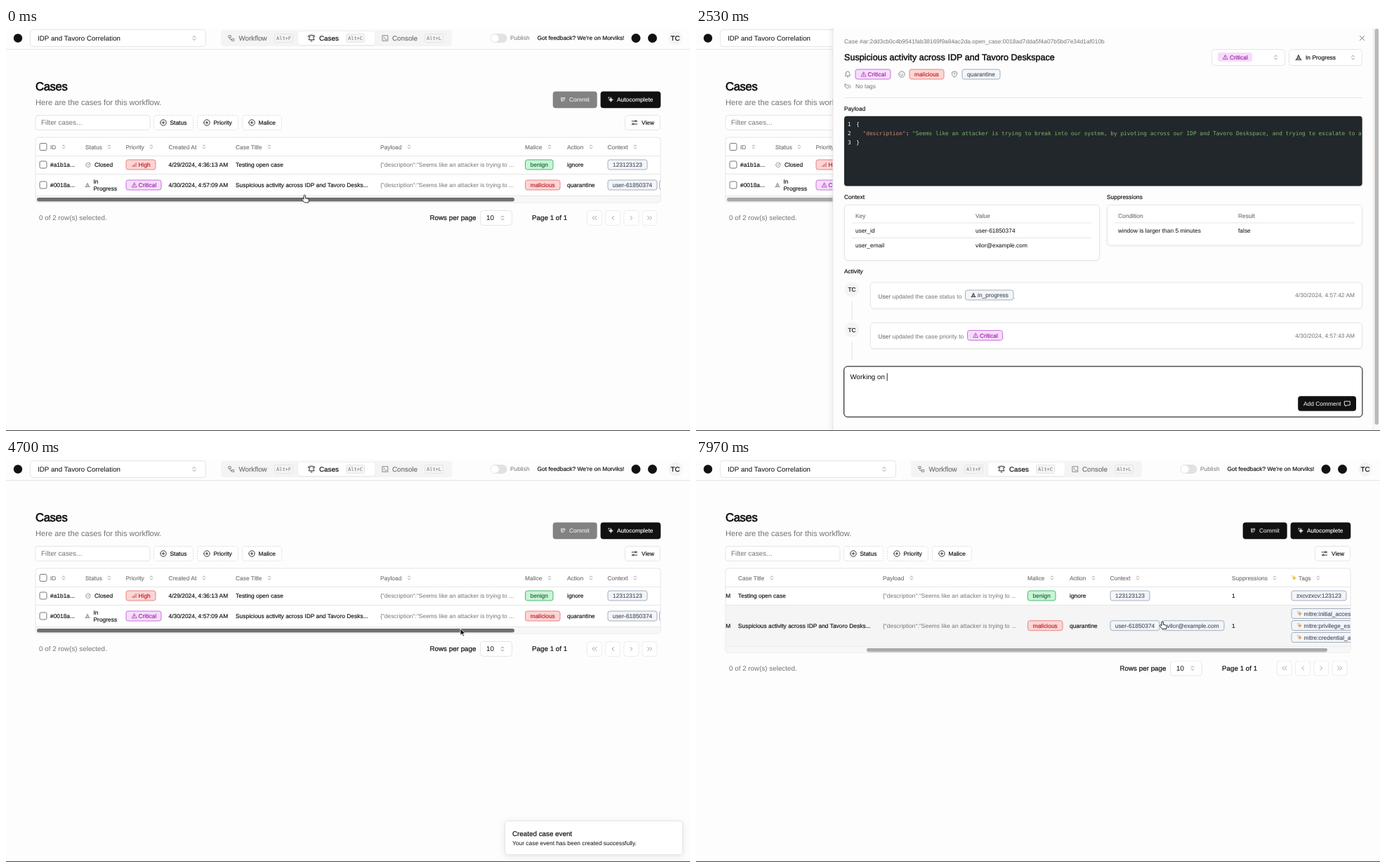
These frames come from a looping animation (974x575 px, 8000 ms). An HTML page:

```html
<!DOCTYPE html>
<html lang="en">
<head>
<meta charset="utf-8">
<title>Cases</title>
<style>
html, body { margin: 0; width: 100%; height: 100%; overflow: hidden; background: #fdfdfd; }
svg { display: block; width: 100vw; height: 100vh; }
text { font: 8.35px "Liberation Sans", Arial, sans-serif; letter-spacing: .004em; fill: currentColor; color: #0a0a0a; white-space: pre; text-rendering: geometricPrecision; }
.l { font-size: 9.74px; }
.xl { font-size: 11.13px; letter-spacing: 0; }
.t { font-size: 12.52px; }
.h { font-size: 16.7px; letter-spacing: -.36px; }
.m { font-family: "DejaVu Sans Mono", monospace; font-size: 7.82px; letter-spacing: 0; }
.k { font-family: "DejaVu Sans Mono", monospace; font-size: 7px; letter-spacing: 0; }
.b { stroke: currentColor; stroke-width: .018em; }
.b.t, .b.h { stroke-width: .035em; }
.g { color: #737373; }
.w { color: #fff; }
.mid { text-anchor: middle; }
.end { text-anchor: end; }
.it { font-style: italic; }
.icon { stroke-width: 2; stroke-linecap: round; stroke-linejoin: round; }
.soft { filter: drop-shadow(0 1px 1px #0000000d); }
.lift { filter: drop-shadow(0 2px 4px #0000001a); }
#spin { transform-origin: 861px 102px; animation: spin 1s linear infinite; }
@keyframes spin { to { transform: rotate(360deg); } }
</style>
</head>
<body>
<svg id="stage" viewBox="0 0 974 575"></svg>
<script>
const LINE = '#e5e5e5', GRAY = '#737373', INK = '#111', MIST = '#f4f4f5';
const ring = 'M2 12a10 10 0 1 0 20 0a10 10 0 1 0-20 0';
const bell = 'M6 8a6 6 0 0 1 12 0c0 7 3 9 3 9H3s3-2 3-9M10 21h4';
const paths = {
  sort: 'm7 15 5 5 5-5M7 9l5-5 5 5',
  plus: ring + 'M8 12h8M12 8v8',
  check: ring + 'm7-1 3 4 7-9',
  cone: 'M2 20h20M5 20 12 3l7 17M9 11h6M7 16h10',
  alert: 'M12 3 2 21h20zM12 9v5M12 17.5v.5',
  bars: 'M4 20v-2M9 20v-6M14 20V10M20 20V4',
  flow: 'M3 3h7v7H3zM14 14h7v7h-7zM7 10v5q0 2 2 2h5',
  bell,
  alarm: bell + 'M2 8q0-4 3-6M22 8q0-4-3-6',
  console: 'M3 3h18v18H3zM7 8l3 3-3 3M12 16h5',
  sliders: 'M3 7h11M19 7h2M16 4.5a2.5 2.5 0 1 0 .1 0M3 17h2M10 17h11M7.5 14.5a2.5 2.5 0 1 0 .1 0',
  smile: ring + 'M8 14q4 4 8 0M9 9v.1M15 9v.1',
  shield: 'M20 13c0 5-4 7-8 9-4-2-8-4-8-9V5l8-3 8 3zM9.5 9a2.5 2.5 0 1 1 2.5 3.5M12 17v.1',
  tags: 'M2 5v6l8 8 6-6-8-8zM15 5l6.5 6.5q1 1.5 0 3L18 18M6 9v.1',
  close: 'M4 4l16 16M20 4 4 20',
  message: 'M3 4h18v13H11l-5 4v-4H3z',
  spark: 'M13 5l2 6 6 2-6 2-2 6-2-6-6-2 6-2zM5 3v4M3 5h4',
  spinner: 'M21 12a9 9 0 1 1-6-8.5',
  commit: 'M4 4h6v6H4zM15 4h5v5h-5zM4 15h6M7 10v11M10 18h5q3 0 3-4V9',
  first: 'm11 18-6-6 6-6M19 18l-6-6 6-6',
  prev: 'm15 18-6-6 6-6',
  next: 'm9 18 6-6-6-6',
  last: 'm5 18 6-6-6-6M13 18l6-6-6-6'
};

const text = (x, y, s, cls = '') => `<text x="${x}" y="${y}" class="${cls}">${s}</text>`;
const rect = (x, y, w, h, r, fill, stroke = 'none', more = '') =>
  `<rect x="${x}" y="${y}" width="${w}" height="${h}" rx="${r}" fill="${fill}" stroke="${stroke}" ${more}/>`;
const icon = (name, cx, cy, size = 9, color = INK) =>
  `<path class="icon" d="${paths[name]}" stroke="${color}" fill="${name === 'spark' ? color : 'none'}" ` +
  `transform="translate(${cx - size / 2} ${cy - size / 2}) scale(${size / 24})"/>`;
const dot = (cx, cy, r, fill) => `<circle cx="${cx}" cy="${cy}" r="${r}" fill="${fill}"/>`;
const hline = (x1, x2, y) => `<path d="M${x1} ${y}H${x2}" stroke="${LINE}"/>`;
const box = (x, y, w, h, more = '') => rect(x, y, w, h, 4, '#fff', LINE, more);
const group = (id, body) => `<g id="${id}">${body}</g>`;

// fill, border, text
const tones = {
  red: ['#fcd5d5', '#e88585', '#b91c1c'],
  green: ['#c9f4d6', '#4bb873', '#166534'],
  pink: ['#f6dcfc', '#c873d8', '#96209f'],
  slate: ['#f3f5f8', '#a3aebd', '#4b5563']
};
const badge = (x, cy, w, label, tone, sign, signColor) => {
  const [fill, border, color] = tones[tone];
  const y = cy + 3;
  const body = sign
    ? icon(sign, x + 11.5, cy, 8, signColor || color) + text(x + 17.5, y, label, 'b')
    : text(x + w / 2, y, label, 'b mid');
  return rect(x, cy - 7, w, 14, 3, fill, border) + `<g class="tone-${tone}">${body}</g>`;
};
const critical = (x, cy) => badge(x, cy, 50, 'Critical', 'pink', 'alert');

const keyTab = (x, s) => rect(x, 8.5, 26, 12, 2, MIST, LINE) + text(x + 13, 17, s, 'k g mid');
const dashed = (x, w, s) => rect(x + .5, 124.5, w, 21, 4, '#fff', '#dcdcdc', 'stroke-dasharray="2 1.5"') +
  icon('plus', x + 14, 135, 10) + text(x + 23.5, 138, s, 'b');
const heading = (x, s, sortX) => text(x, 172.5, s, 'g b') + icon('sort', sortX, 169.5, 8, GRAY);
const checkbox = cy => rect(48, cy - 5, 10, 10, 2, '#fff', '#777');
const pageButton = (x, name) => rect(x, 260.5, 21, 21, 4, '#fff', '#ececec') + icon(name, x + 10.5, 271, 10, '#8a8a8a');

const topBar = hline(0, 974, 30.5) + dot(17, 14.5, 6.2, INK) +
  box(34.5, 2.5, 250, 24) + text(45, 18, 'IDP and Tavoro Correlation', 'l') + icon('sort', 268, 14.5, 9, GRAY) +
  rect(306, 3, 329, 23, 4, MIST) + rect(416, 5, 109, 19, 3, '#fff', 'none', 'class="soft"') +
  icon('flow', 321, 14.5, 10, GRAY) + text(331.5, 18, 'Workflow', 'l g b') + keyTab(382.5, 'Alt+F') +
  icon('alarm', 435, 14.5, 11) + text(446, 18, 'Cases', 'l b') + keyTab(484.5, 'Alt+C') +
  icon('console', 540, 14.5, 10, GRAY) + text(550, 18, 'Console', 'l g b') + keyTab(596.5, 'Alt+L') +
  rect(689.5, 8, 24, 13, 6.5, '#e2e2e2') + dot(696, 14.5, 5.6, '#fff') + text(718, 17.2, 'Publish', 'g') +
  text(756.5, 17.3, "Got feedback? We're on Morviks!", 'b') +
  dot(897, 14.5, 6.5, INK) + dot(920.5, 14.5, 6.5, INK) + dot(953, 14.5, 10, MIST) + text(953, 18, 'TC', 'l b mid');

const toolbar = text(42, 88.5, 'Cases', 'h b') + text(42, 110, 'Here are the cases for this workflow.', 'xl g') +
  group('commit', rect(778.7, 90.5, 63, 23.7, 4, INK)) + icon('commit', 793, 102, 8, '#fff') + text(802, 105, 'Commit', 'w') +
  group('auto', rect(846.6, 90.5, 85.7, 23.7, 4, 'inherit')) +
  group('sparkle', icon('spark', 861, 102, 9, '#fff')) +
  group('loading', group('spin', icon('spinner', 861, 102, 9, '#fff'))) + text(870, 105, 'Autocomplete', 'w b') +
  box(42, 124.5, 163, 21) + text(50, 138.3, 'Filter cases...', 'l g') +
  dashed(210, 56, 'Status') + dashed(272, 58, 'Priority') + dashed(336, 56, 'Malice') +
  box(881.5, 124.5, 50, 21) + icon('sliders', 895, 135, 10) + text(905, 138, 'View', 'b');

const payload = '{"description":"Seems like an attacker is trying to ...';
const tableCells = checkbox(169.5) + [
  [63, 'ID', 82], [113, 'Status', 147], [170.5, 'Priority', 207], [231.5, 'Created At', 282],
  [327, 'Case Title', 375], [533, 'Payload', 574], [739, 'Malice', 774], [799, 'Action', 833],
  [856.5, 'Context', 896], [1030, 'Suppressions', 1091], [1125, 'Tags', 1153]
].map(h => heading(...h)).join('') + icon('spark', 1118.5, 169.5, 8, '#e3b93c') +
  checkbox(195) + text(63, 198, '#a1b1a...', 'b') + icon('check', 117, 195.3, 8, GRAY) + text(126, 198, 'Closed', 'b') +
  badge(171, 195, 42, 'High', 'red', 'bars') + text(231.5, 198, '4/29/2024, 4:36:13 AM', 'b') +
  text(327, 198, 'Testing open case', 'b') + text(533, 198, payload, 'g') + badge(739.5, 195, 39.5, 'benign', 'green') +
  text(799, 198, 'ignore', 'b') + badge(857, 195, 56, '123123123', 'slate') + text(1030, 198, '1', 'b') +
  badge(1115, 195, 78, 'zxcvzxcv:123123', 'slate') +
  group('row2', checkbox(224) + text(63, 227, '#0018a...', 'b') + icon('cone', 116, 224, 8, GRAY) +
    text(124.5, 221.5, 'In', 'b') + text(124.5, 231.7, 'Progress', 'b') + critical(171, 224) +
    text(231.5, 227, '4/30/2024, 4:57:09 AM', 'b') +
    text(327, 227, 'Suspicious activity across IDP and Tavoro Desks...', 'b') + text(533, 227, payload, 'g') +
    badge(739.5, 224, 49.5, 'malicious', 'red') + text(799, 227, 'quarantine', 'b') +
    badge(857, 224, 70, 'user-61850374', 'slate') + badge(930.5, 224, 88.5, 'vilor@example.com', 'slate') +
    text(1030, 227, '1', 'b') + group('noTags', text(1115, 227, 'No tags', 'g'))) +
  group('newTags', ['initial_access', 'privilege_escalation', 'credential_access']
    .map((s, i) => badge(1115, 220.5 + 17 * i, 125, 'mitre:' + s, 'slate', 'spark', '#e39a3c')).join(''));

const table = rect(42, 156, 890, 93, 4, '#fff', LINE, 'id="card"') +
  `<g clip-path="url(#tableClip)">` + group('rowHover', rect(42, 209, 890, 30.5, 0, '#f5f5f5', 'none', 'id="rowFill"')) +
  hline(42, 932, 182.5) + hline(42, 932, 208.5) + group('cols', tableCells) + '</g>' +
  group('below', rect(42.5, 240, 889, 8.6, 3, '#f7f7f7') + hline(42, 932, 239.5) +
    group('thumbMove', group('thumbTone', rect(44, 242, 680, 5.4, 2.7, 'inherit', 'none', 'id="thumb"'))) +
    text(47, 274.3, '0 of 2 row(s) selected.', 'l g') + text(603.5, 274.3, 'Rows per page', 'l b') +
    box(675.5, 260.5, 45, 21) + text(684, 274.3, '10', 'l') + icon('sort', 707, 271, 9, GRAY) +
    text(749, 274.3, 'Page 1 of 1', 'l b') +
    ['first', 'prev', 'next', 'last'].map((s, i) => pageButton(827.5 + 26.2 * i, s)).join(''));

const choice = x => box(x, 30.5, 104, 23) + icon('sort', x + 91, 42, 9, GRAY);
const card = (x, y, w, h) => rect(x, y, w, h, 5, '#fff', LINE, 'class="soft"');
const activity = (y, h, message, date, extra) =>
  `<path d="M222 ${y + 27}v${h - 10}" stroke="${LINE}"/>` + dot(222, y + 10, 10.5, MIST) +
  text(222, y + 13.2, 'TC', 'b mid') + card(248.5, y, 700, h) +
  text(259.5, y + (h > 50 ? 18 : 22.5), `<tspan class="b">User</tspan> ${message}`, 'g') +
  text(938, y + (h > 50 ? 18 : 21), `4/30/2024, ${date} AM`, 'g end') + extra;

const typed = 'Working on it!';
const content = text(211, 22.3, 'Case #ar:2dd3cb0c4b9541fab38169f9a84ac2da.open_case:0018ad7dda5f4a07b5bd7e34d1af010b', 'g') +
  icon('close', 948.5, 14.5, 9, '#444') +
  text(211, 46, 'Suspicious activity across IDP and Tavoro Deskspace', 't b') +
  choice(734.5) + rect(743, 35, 49, 13, 3, tones.pink[0]) + icon('alert', 753.5, 41.5, 8, tones.pink[2]) +
  '<g class="tone-pink">' + text(760, 44.5, 'Critical', 'b') + '</g>' +
  choice(844.5) + icon('cone', 858, 42, 10) + text(868, 45, 'In Progress', 'b') +
  icon('bell', 216, 66, 10, GRAY) + critical(227, 66) + icon('smile', 293, 66, 10, GRAY) +
  badge(304, 66, 49, 'malicious', 'red') + icon('shield', 368, 66, 10, GRAY) + badge(379, 66, 54, 'quarantine', 'slate') +
  icon('tags', 216, 83.5, 10, GRAY) + text(227, 86.3, 'No tags', 'g') + hline(211, 949, 99.5) +
  text(211, 118, 'Payload', 'b') + rect(211, 125.7, 737.7, 99.8, 4, '#21272b') +
  '<g clip-path="url(#codeClip)">' + [1, 2, 3].map(i => text(216, 126.8 + 13 * i, i, 'm w')).join('') +
  text(228.3, 139.8, '{', 'm w') + text(228.3, 165.8, '}', 'm w') +
  text(237.5, 152.8, '<tspan fill="#ce8a70">"description"</tspan>: <tspan fill="#7fb36c">"Seems like an attacker is trying to break into our system, by pivoting across our IDP and Tavoro Deskspace, and trying to escalate to a</tspan>', 'm w') + '</g>' +
  text(211, 244, 'Context', 'b') + card(211.5, 252.5, 363, 79) +
  text(227, 271.3, 'Key', 'g b') + text(398, 271.3, 'Value', 'g b') + hline(222, 563, 278) +
  text(227, 291.5, 'user_id') + text(398, 291.5, 'user-61850374') + hline(222, 563, 299.5) +
  text(227, 313, 'user_email') + text(398, 313, 'vilor@example.com') +
  text(585, 244, 'Suppressions', 'b') + card(585.5, 252.5, 363, 57.5) +
  group('ruleHover', rect(596, 278, 342, 21.5, 0, '#f5f5f5')) +
  text(601, 271.3, 'Condition', 'g b') + text(772, 271.3, 'Result', 'g b') + hline(596, 938, 278) +
  text(601, 291.5, 'window is larger than 5 minutes') + text(772, 291.5, 'false') +
  text(211, 350.3, 'Activity', 'b') +
  activity(363, 37, 'updated the case status to', '4:57:42',
    badge(383.5, 381, 68.5, 'in_progress', 'slate', 'cone', INK) + text(452.5, 385.5, '.', 'g')) +
  activity(420.5, 37, 'updated the case priority to', '4:57:43', critical(386.5, 438.5) + text(437, 443, '.', 'g')) +
  group('newEvent', activity(478.5, 64.5, 'added a comment to the case.', '5:00:25',
    rect(259.5, 505, 678, 26.5, 3, '#f4f6f8', '#e2e8f0') + text(268, 521, typed, 'g it'))) +
  group('composer', rect(211.5, 483.5, 737, 71, 5, '#fff', LINE, 'class="soft"') +
    group('focus', rect(210.7, 482.8, 738.2, 72.2, 5, 'none', INK)) +
    group('hint', text(219.5, 501.3, 'Add a comment...', 'l g')) +
    text(219.5, 501.3, [...typed].map((c, i) => `<tspan id="c${i}">${c}</tspan>`).join(''), 'l" id="draft') +
    group('caretShow', group('caret', rect(0, 492.5, .9, 11, 0, INK))) +
    group('send', rect(857.2, 525.2, 82.8, 21.2, 4, 'inherit')) + text(865, 538.5, 'Add Comment', 'w') +
    icon('message', 927.5, 536, 10, '#fff'));

const panel = rect(195, -5, 800, 585, 0, '#fdfdfd', LINE, 'class="lift"') + group('scroll', content) +
  rect(964.5, -1, 12, 577, 0, '#fafafa', '#ebebeb') +
  group('barMove', rect(966.5, 1, 5.5, 565, 2.7, '#b9b9b9', 'none', 'id="bar"'));

const toast = rect(710.5, 516.5, 253, 48, 4, '#fff', LINE, 'class="lift"') +
  text(721, 537.5, 'Created case event', 'l b') + text(721, 551, 'Your case event has been created successfully.');

const cursor = group('arrow', '<path d="M0 0v9.5l2.3-2 1.6 3.6 1.6-.7-1.6-3.5h3z" fill="#111" stroke="#fff" stroke-width=".8"/>') +
  group('hand', '<path d="M-1 1a1.2 1.2 0 0 1 2.4 0v3.2l3.6.9q1.6.4 1.4 2.2l-.6 3.2H.2L-3.4 6.6q-.9-1.3.2-1.8 1-.4 2.2 1z" fill="#fff" stroke="#111" stroke-width=".9"/>');

stage.innerHTML = '<defs><clipPath id="tableClip"><rect x="42.5" y="156" width="889" height="130"/></clipPath>' +
  '<clipPath id="codeClip"><rect x="211" y="126" width="738" height="99"/></clipPath></defs>' +
  topBar + toolbar + table + group('panel', panel) + group('toast', toast) +
  rect(0, 574, 974, 1, 0, '#484848') + group('cursor', cursor);

// Motion: every track is [ms, value] stops on one 8 s loop.
let rules = Object.entries(tones).map(([k, v]) => `.tone-${k} text{color:${v[2]}}`).join('');
let count = 0;
const animate = (id, prop, stops, ease = 'step-end') => {
  const name = 'k' + count++;
  rules += `@keyframes ${name}{${stops.map(([ms, v]) => `${ms / 80}%{${prop}:${v}}`).join('')}}` +
    `#${id}{animation:${name} 8s ${ease} infinite}`;
};
const move = (id, stops, ease = 'step-end') =>
  animate(id, 'transform', stops.map(([ms, x, y]) => [ms, `translate(${x}px,${y}px)`]), ease);
const show = (id, from, to = 8000) => animate(id, 'opacity', [[0, from ? 0 : 1], [from, 1], [to, 0]]);
const glide = 'cubic-bezier(.4,0,.2,1)', TAGGED = 7600, POSTED = 3450;

move('panel', [[0, 795, 0], [112, 795, 0], [612, 0, 0], [4260, 0, 0], [4560, 795, 0], [8000, 795, 0]], glide);
move('scroll', [[0, 0, 0], [3580, 0, 0], [3760, 0, -20], [8000, 0, -20]], 'ease-out');
move('barMove', [[0, 0, 0], [3580, 0, 0], [3760, 0, 17], [8000, 0, 17]], 'ease-out');
animate('bar', 'height', [[0, '565px'], [POSTED, '492px']]);
show('newEvent', POSTED);
move('composer', [[0, 0, 0], [POSTED, 0, 85.5]]);
show('ruleHover', 3650, 3950);
animate('send', 'fill', [[0, INK], [3230, '#2a2a2a'], [3500, INK]]);

const keyTime = i => 1720 + 75 * i;
show('focus', 1450);
show('hint', 0, keyTime(0));
show('caretShow', 1450, 3350);
[...typed].forEach((c, i) => animate('c' + i, 'fill', [[0, 'transparent'], [keyTime(i), '#0a0a0a']]));
move('caret', [[0, 219.5, 0], ...[...typed].map((c, i) => [keyTime(i), 219.5 + draft.getSubStringLength(0, i + 1), 0])]);

move('toast', [[0, 0, 70], [POSTED + 30, 0, 70], [POSTED + 230, 0, 0], [6200, 0, 0], [6350, 275, 0], [8000, 275, 0]], 'ease');
move('cols', [[0, 0, 0], [5030, 0, 0], [5300, -267, 0], [8000, -267, 0]], 'ease-in-out');
move('thumbMove', [[0, 0, 0], [5030, 0, 0], [5300, 206, 0], [TAGGED - .1, 206, 0], [TAGGED, 199, 0], [8000, 199, 0]], 'ease-in-out');
animate('thumbTone', 'fill', [[0, '#707070'], [70, '#a9a9a9'], [4600, '#707070'], [5340, '#a9a9a9']]);
animate('thumb', 'width', [[0, '680px'], [TAGGED, '656px']]);
animate('card', 'height', [[0, '93px'], [TAGGED, '120.5px']]);
animate('rowFill', 'height', [[0, '30.5px'], [TAGGED, '58px']]);
animate('rowHover', 'opacity', [[0, 0], [70, 1], [1000, 0], [7530, 1]]);
move('row2', [[0, 0, 0], [TAGGED, 0, 13.7]]);
move('below', [[0, 0, 0], [TAGGED, 0, 27.5]]);
show('noTags', 0, TAGGED);
show('newTags', TAGGED);

animate('commit', 'opacity', [[0, .52], [TAGGED, 1]]);
animate('auto', 'fill', [[0, INK], [5650, '#2a2a2a'], [6900, INK]]);
animate('sparkle', 'opacity', [[0, 1], [5770, 0], [TAGGED, 1]]);
show('loading', 5770, TAGGED);

move('cursor', [[0, 425, 238.5], [100, 422.5, 227.5], [900, 422.5, 227.5], [1400, 400, 505], [2850, 400, 505],
  [3250, 900, 536], [3450, 900, 536], [3750, 660, 297], [4250, 660, 297], [4600, 647, 242], [5030, 647, 242],
  [5300, 853, 242], [5560, 908, 117], [5600, 908, 117], [5740, 895, 104], [6850, 895, 104], [7480, 664, 232], [8000, 664, 232]], 'ease-in-out');
animate('hand', 'opacity', [[0, 1], [950, 0], [7480, 1]]);
animate('arrow', 'opacity', [[0, 0], [950, 1], [1700, 0], [2850, 1], [7480, 0]]);

document.head.appendChild(document.createElement('style')).textContent = rules;
</script>
</body>
</html>
```
